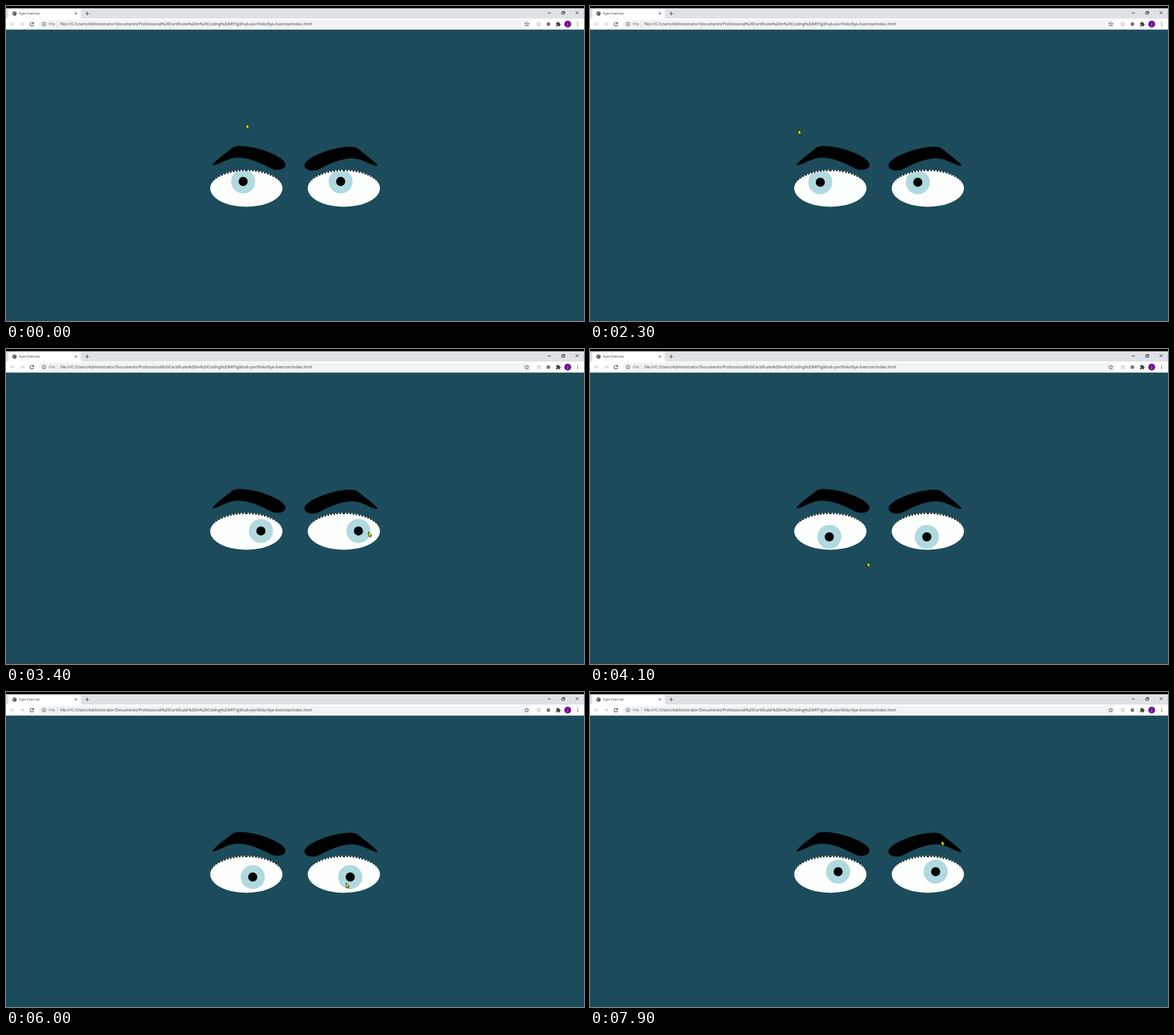
These frames come from a looping animation (1013x553 px, 8000 ms). An HTML page:

```html
<!DOCTYPE html>
<html lang="en">
<head>
<meta charset="utf-8">
<title>Eyes Exercise</title>
<style>
  html, body { margin: 0; width: 100%; height: 100%; overflow: hidden; background: #1c4c5b; }
  svg { display: block; width: 1013px; height: 553px; }
  text { font: 7.02px "Open Sans", "Noto Sans", sans-serif; fill: #333; text-rendering: geometricPrecision; }
  .line { fill: none; stroke: #444; }
</style>
</head>
<body>
<svg viewBox="0 0 1013 553">
  <defs>
    <clipPath id="inner"><path d="M-63.3 0A63.3 30 0 0 1 63.3 0A63.3 32.6 0 0 1 -63.3 0Z"/></clipPath>
    <clipPath id="rim"><path clip-rule="evenodd" d="M-63.3 0A63.3 32.8 0 0 1 63.3 0A63.3 30.1 0 0 0 -63.3 0Z"/></clipPath>
    <g id="ball">
      <ellipse rx="63.3" ry="32.6" fill="#fdfffe"/>
      <g clip-path="url(#rim)" fill="none" stroke="#000" stroke-width="2.8" stroke-linecap="round" stroke-dasharray="0 5.28" stroke-dashoffset="-1">
        <path d="M0 -31.4A63.3 31.4 0 0 1 63.3 0"/>
        <path d="M0 -31.4A63.3 31.4 0 0 0 -63.3 0"/>
      </g>
    </g>
    <g id="iris"><circle r="21.1" fill="#b0d9e0"/><circle r="8"/></g>
    <path id="brow" stroke="#0c2a35" d="M363 277C370 269 388 256 397 248.500C404 244 420 245.500 436 249C462 255 490 268 490 279C489 288 474 290 464 285C446 275 420 264 401 266.500C388 268 375 277 366 279C363 280 362 279 363 277Z"/>
    <path id="lashes"/>
  </defs>

  <!-- browser window -->
  <path d="M0 0H1013V4H0Z"/>
  <path d="M0 4H1013V22H0Z" fill="#dee1e6"/>
  <path d="M0 22H1013V41.5H0Z" fill="#fff"/>
  <path d="M1 22Q4 22 4 19V8Q4 5 7 5H128Q131 5 131 8V19Q131 22 134 22Z" fill="#fff"/>
  <circle cx="15" cy="13.2" r="3.7" fill="#4d5156"/>
  <path d="M12.5 12l2 1.3l-.7 1.7M15.3 10.5l2 1.2" class="line" style="stroke:#fff"/>
  <text x="23" y="15.4" style="font-size:5.9px">Eyes Exercise</text>
  <path d="M120.4 11.2l4 4m0-4l-4 4M139 13.2h6.6m-3.3-3.3v6.6" class="line"/>
  <path d="M949.5 12.2h5.5M974 11h4v3.6h-4zM975.3 11v-1.3h3.9v3.7h-1.2M998.3 9.4l5 5m0-5l-5 5" class="line" style="stroke:#222;stroke-width:.9"/>
  <path d="M15.5 31.7h-7m3.3-3.3l-3.3 3.3l3.3 3.3M24.7 31.7h7m-3.3-3.3l3.3 3.3l-3.3 3.3" class="line" style="stroke:#bfc1c4"/>
  <path d="M47.8 29.8A3.2 3.2 0 1 0 48.5 32.6" class="line" style="stroke-width:1.1"/>
  <path d="M49 27.8v3.5h-3.5z" fill="#444"/>
  <rect x="57.5" y="24.3" width="864" height="15" rx="7.5" fill="#f1f3f4"/>
  <circle cx="66.6" cy="31.7" r="3.3" class="line" style="stroke-width:.8"/>
  <path d="M66.6 31v2.6M66.6 29.4v.9" class="line"/>
  <text x="75" y="34.2" style="fill:#5f6368">File</text>
  <path d="M90.2 27v10" class="line" style="stroke:#bbb;stroke-width:.7"/>
  <text x="95" y="34.2">file:///C:/Users/Administrator/Documents/Professional%20Certificate%20in%20Coding%20MIT/github-portfolio/Eye-Exercise/index.html</text>
  <path d="M912.7 28l1.1 2.5l2.7.2l-2.1 1.8l.7 2.7l-2.4-1.5l-2.4 1.5l.7-2.7l-2.1-1.8l2.7-.2z" class="line" style="stroke-width:.8"/>
  <rect x="930" y="28" width="7.6" height="7.6" fill="#e2e2e2"/>
  <circle cx="950.6" cy="31.8" r="3.2" fill="#777"/>
  <path d="M964 29.3h2q0-1.7 1.3-1.7t1.3 1.7h2v2q1.4 0 1.4 1.3t-1.4 1.3v1.8h-2.2q0-1.5-1.1-1.5t-1.1 1.5h-2.2v-2.2q1.4 0 1.4-1.1t-1.4-1.1z" fill="#444"/>
  <circle cx="984.5" cy="31.7" r="6" fill="#720e96"/>
  <text x="984.5" y="34" text-anchor="middle" style="fill:#fff;font-size:6px">J</text>
  <path d="M1001.7 28.2v1.4m0 1.4v1.4m0 1.4v1.4" class="line" style="stroke-width:1.4"/>
  <path d="M0 41H1013V42H0Z" fill="#dadce0"/>
  <path d="M0 41.5H1013V553H0Z" fill="#1c4c5b"/>

  <!-- face -->
  <use href="#brow"/>
  <use href="#brow" transform="translate(1013 1.300) scale(-1 1)"/>
  <g id="open0" transform="translate(421.2 320)"><use href="#ball"/><g clip-path="url(#inner)"><use href="#iris" class="iris"/></g></g>
  <g id="open1" transform="translate(592.1 320)"><use href="#ball"/><g clip-path="url(#inner)"><use href="#iris" class="iris"/></g></g>
  <use id="shut0" href="#lashes"/>
  <use id="shut1" href="#lashes" transform="translate(1013 -1.500) scale(-1 1)"/>
  <path id="cursor" d="M0 0V8.500L1.900 6.900L3.200 9.700L4.700 9L3.500 6.300H6Z" fill="#ffee00" stroke="#000" stroke-width=".8"/>
</svg>
<script>
const $ = id => document.getElementById(id);
const LOOP = 8000, STEP = 100;

// turning points of the pointer: time, x, y
const path = [
  [-100, 462, 204], [0, 421, 207], [250, 24, 20], [550, 975, 200], [800, 400, 205],
  [1400, 77, 10], [2100, 367, 212], [2300, 365, 217], [2600, 375, 445], [2900, 661, 374],
  [3200, 745, 280], [3600, 515, 365], [4100, 486, 374], [4700, 429, 328], [5200, 429, 328],
  [5900, 596, 335], [6900, 596, 335], [7600, 616, 261], [LOOP, 616, 261]
];
const BLINK = 500, blinkAt = [5200, 6400];

// smooth speed at a key: zero at turns and rests, so the curve never overshoots
const slope = (i, k) => path[i] && path[i + 1]
  ? (path[i + 1][k] - path[i][k]) / (path[i + 1][0] - path[i][0]) : 0;
function speed(i, k) {
  const a = slope(i - 1, k), b = slope(i, k);
  return a * b > 0 ? 2 * a * b / (a + b) : 0;
}

function pointer(t) {
  const i = path.findIndex(p => p[0] > t) - 1;
  const a = path[i], b = path[i + 1], d = b[0] - a[0], u = (t - a[0]) / d;
  const s = u * u * (3 - 2 * u);
  return [1, 2].map(k => a[k] + (b[k] - a[k]) * s
    + d * u * (1 - u) * ((1 - u) * speed(i, k) - u * speed(i + 1, k)));
}

// a curved lid with tapered lashes fanned along an oval
function lashes(n) {
  let d = "M358.500 337.500C366 342 374 343 384 340C400 338 424 351 450 350.500Q470 350 484 346.500Q474 354 456 358Q430 361 404 353Q385 346 376 347Q363 346 358.500 337.500Z";
  for (let i = 0; i < n; i++) {
    const u = i / (n - 1), a = Math.PI * (0.96 - 0.88 * u), c = Math.cos(a);
    const tx = 437 + c * (c < 0 ? 76 : 44), ty = 345 + 37 * Math.sin(a);
    const rx = 383 + 92 * u, ry = 344 + 8 * Math.sin(Math.PI * u * 0.75);
    const len = Math.hypot(tx - rx, ty - ry);
    const nx = (ty - ry) / len * 3.3, ny = (rx - tx) / len * 3.3;
    const cx = rx + (tx - rx) * 0.45, cy = ry + (ty - ry) * 0.75;
    d += `M${rx + nx} ${ry + ny}Q${cx + nx * 0.7} ${cy + ny * 0.7} ${tx} ${ty}`
       + `Q${cx - nx * 0.7} ${cy - ny * 0.7} ${rx - nx} ${ry - ny}Z`;
  }
  return d;
}
$("lashes").setAttribute("d", lashes(19));

const move = (el, x, y) => el.setAttribute("transform", `translate(${x} ${y})`);
const irises = document.querySelectorAll(".iris");

function draw(now) {
  const t = Math.floor(now % LOOP / STEP) * STEP;
  move($("cursor"), ...pointer(t));
  // the irises follow one step behind
  const [x, y] = pointer(t - STEP);
  const ix = 126.6 * (x / 1013 - 0.5), iy = 65.2 * (Math.max(0, y - 41.5) / 511.5 - 0.5);
  irises.forEach(el => move(el, ix, iy));
  blinkAt.forEach((start, i) => {
    const shut = t >= start && t < start + BLINK;
    $("open" + i).style.display = shut ? "none" : "";
    $("shut" + i).style.display = shut ? "" : "none";
  });
  requestAnimationFrame(draw);
}
draw(0);
</script>
</body>
</html>
```
